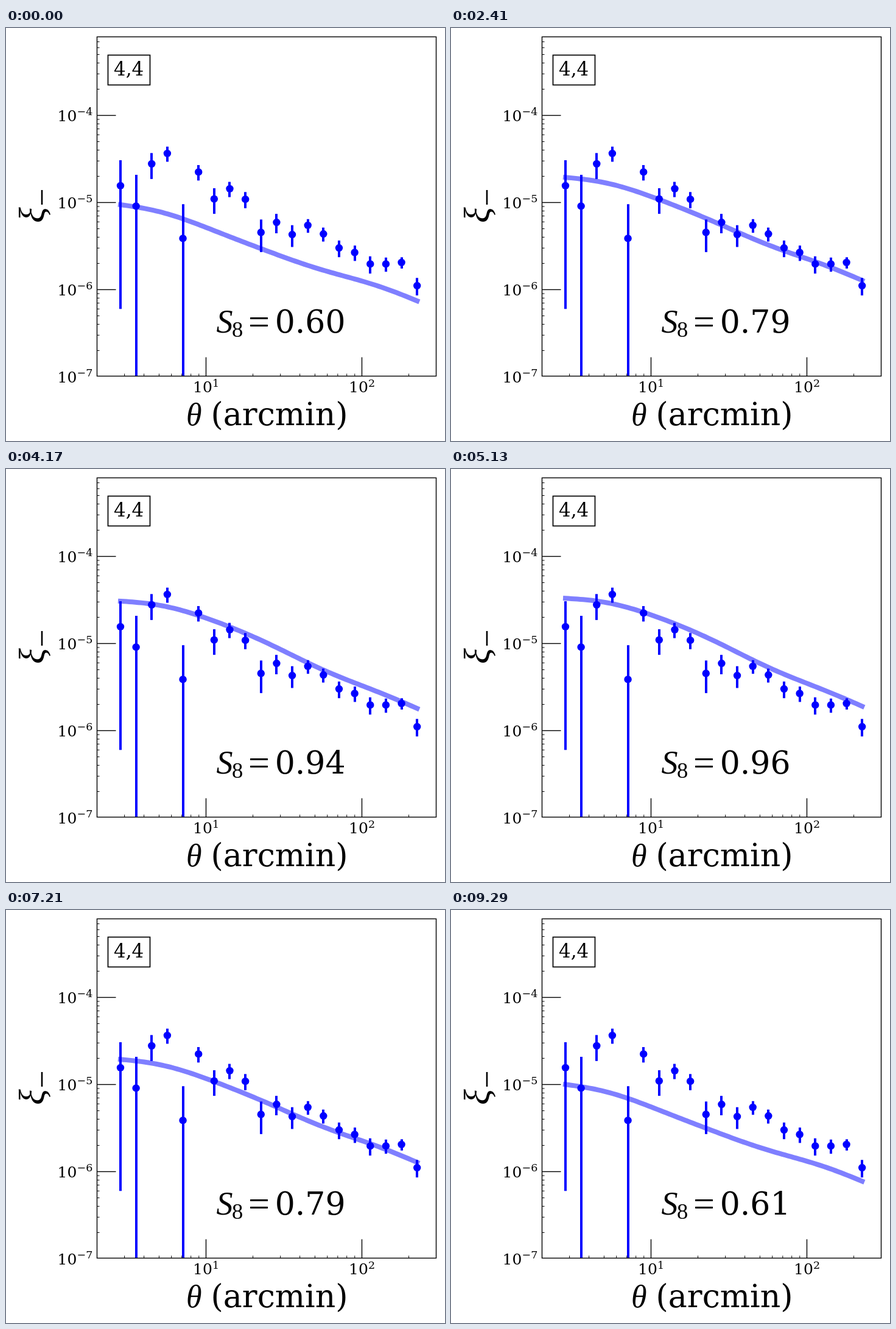
These frames come from a looping animation (721x678 px, 9.45 s). An HTML page with a canvas:

```html
<!DOCTYPE html>
<html lang="en">
<head>
<meta charset="utf-8">
<title>Correlation function against S8</title>
<style>
  html, body { margin: 0; width: 100%; height: 100%; overflow: hidden; background: #fff; }
  canvas { display: block; }
</style>
</head>
<body>
<canvas id="plot" width="721" height="678"></canvas>
<script>
const ctx = document.getElementById('plot').getContext('2d');
const SERIF = '"DejaVu Serif", serif';
const MATH = '"Liberation Serif", serif';
const FRAME = { left: 149.5, top: 14.5, right: 706.5, bottom: 571.5 };
const FIRST_X = 188, LAST_X = 675.2;
const LOOP = 9450, HOLD = 330, STEP = 160, PEAK = 29;
const S_MIN = 0.6, S_MAX = 0.99, S_REF = 0.936;

// Measured xi in units of 1e-6, evenly spaced in log theta
const measured = [
  15.6, 9.1, 27.8, 36.6, 3.87, 22.4, 11, 14.4, 10.9, 4.54,
  5.92, 4.29, 5.47, 4.36, 3.01, 2.67, 1.97, 1.97, 2.05, 1.11
];

const thetaX = exponent => 72.5 + 256 * exponent;
const xiY = exponent => 143.5 - 143 * (exponent + 4);
const dataX = u => FIRST_X + u * (LAST_X - FIRST_X);
const dataY = xi => xi > 0 ? Math.min(xiY(Math.log10(xi) - 6), FRAME.bottom) : FRAME.bottom;

function text(string, x, y, size, family = SERIF, style = '') {
  ctx.font = `${style} ${size}px ${family}`;
  ctx.fillText(string, x, y);
}

function line(x1, y1, x2, y2, width) {
  ctx.lineWidth = width;
  ctx.beginPath();
  ctx.moveTo(x1, y1);
  ctx.lineTo(x2, y2);
  ctx.stroke();
}

function power(exponent, x, y) {
  text('10', x, y, 25);
  text(String(exponent).replace('-', '\u2212'), x + 32, y - 9.5, 17.5);
}

// Theory curve: a straight fall plus a few harmonics, lifted as S8 grows
function curveY(u, lift) {
  const wave = n => Math.sin(n * Math.PI * u);
  const base = 290 + 158 * u - 4.9 * wave(1) - 3.75 * wave(2) - 3.8 * wave(3) - 0.9 * wave(5);
  const rise = 73 - 18 * u + 14 * wave(1) + 4.8 * wave(2) - 2 * wave(3);
  return base - lift * rise;
}

function drawCurve(s) {
  const lift = Math.log(s / S_MIN) / Math.log(S_REF / S_MIN);
  ctx.beginPath();
  for (let i = 0; i <= 100; i++) ctx.lineTo(dataX(i / 100), curveY(i / 100, lift));
  ctx.strokeStyle = 'rgba(0, 0, 255, 0.5)';
  ctx.lineWidth = 8;
  ctx.lineCap = 'square';
  ctx.lineJoin = 'round';
  ctx.stroke();
  ctx.lineCap = 'butt';
  ctx.lineJoin = 'miter';
}

function drawPoints() {
  const last = measured.length - 1;
  ctx.strokeStyle = ctx.fillStyle = '#00f';
  measured.forEach((xi, i) => {
    const x = dataX(i / last);
    const error = 15 * Math.exp(-0.215 * i - 0.0018 * i * (last - i));
    line(Math.round(x), dataY(xi + error), Math.round(x), dataY(xi - error), 4);
    ctx.beginPath();
    ctx.arc(x, dataY(xi), 6.2, 0, 2 * Math.PI);
    ctx.fill();
  });
}

function drawAxes() {
  const { left, top, right, bottom } = FRAME;
  ctx.strokeStyle = ctx.fillStyle = '#000';
  ctx.lineWidth = 1.4;
  ctx.strokeRect(left, top, right - left, bottom - top);

  for (let n = 1; n < 10; n++) {
    const [length, width] = n === 1 ? [31, 1.4] : [4, 1];
    for (let decade = 0; decade <= 2; decade++) {
      const x = thetaX(decade + Math.log10(n));
      if (x > left && x < right) line(x, bottom, x, bottom - length, width);
    }
    for (let decade = -7; decade <= -4; decade++) {
      const y = xiY(decade + Math.log10(n));
      if (y > top + 1 && y < bottom - 1) line(left, y, left + length, y, width);
    }
  }
  for (let decade = -7; decade <= -4; decade++) power(decade, 84.5, xiY(decade) + 9);
  for (let decade = 1; decade <= 2; decade++) power(decade, thetaX(decade) - 21.5, 598.3);

  ctx.lineWidth = 1.7;
  ctx.strokeRect(167.5, 44.5, 69, 49);
  text('4,4', 177, 77.5, 31);

  text('θ', 296, 652, 52, MATH, 'italic');
  text('(arcmin)', 336.5, 652, 52);

  ctx.save();
  ctx.translate(63, 320);
  ctx.rotate(-Math.PI / 2);
  text('ξ', 0, 0, 60, MATH, 'italic');
  ctx.restore();
  line(59, 266, 59, 290, 2.6);
}

function drawValue(s) {
  text('S', 345.5, 499.5, 54, MATH, 'italic');
  text('8', 371, 507, 36.5, MATH);
  text('=', 398, 503, 62, MATH);
  text(s.toFixed(2), 441.7, 499.5, 52);
}

function draw(now) {
  const time = now % LOOP;
  const step = time < HOLD ? 0 : 1 + Math.floor((time - HOLD) / STEP);
  const level = PEAK - Math.abs(PEAK - step);
  const s = S_MIN + (S_MAX - S_MIN) * level / PEAK;

  ctx.fillStyle = '#fff';
  ctx.fillRect(0, 0, 721, 678);
  drawCurve(s);
  drawPoints();
  drawAxes();
  drawValue(s);
  requestAnimationFrame(draw);
}

draw(0);
</script>
</body>
</html>
```
